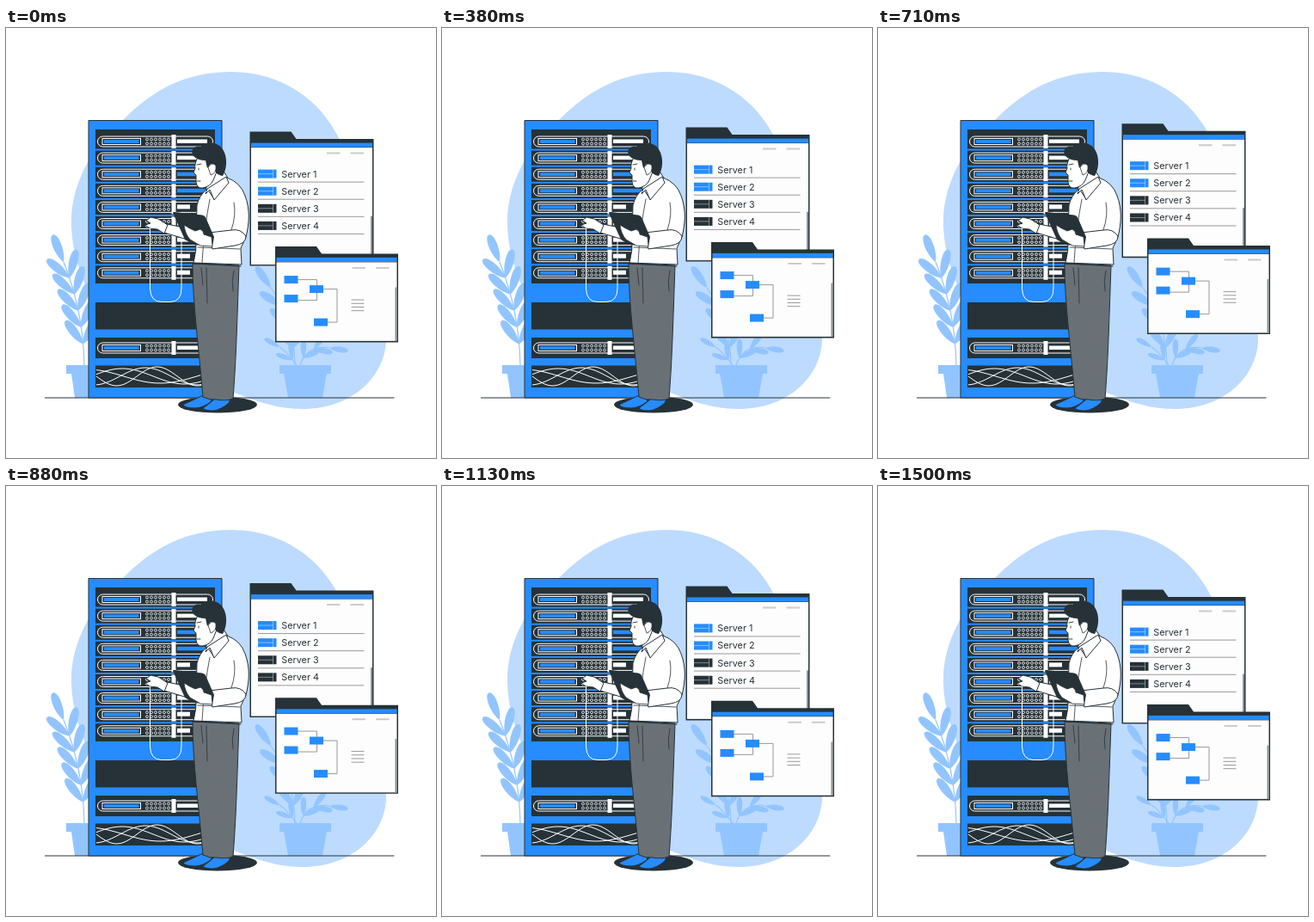
These frames come from a looping animation (500 px wide and 500 px high, 1540 ms). An HTML page:

```html
<!DOCTYPE html>
<html lang="en">
<head>
<meta charset="utf-8">
<title>Server room</title>
<style>
  html, body { margin: 0; width: 100%; height: 100%; overflow: hidden; background: #fff; }
  svg { display: block; width: 100%; height: 100%; }
  text { font: 10.8px Inter, "Open Sans", sans-serif; fill: #263238; }
  .blue { fill: #268cff; }
  .dark { fill: #263238; }
  .white { fill: #fff; }
  .paper { fill: #fdfdfd; }
  .shade { fill: #8c9194; }
  .plant { fill: #92c5ff; }
  .stem { fill: none; stroke: #92c5ff; stroke-width: 1.2; }
  .line { fill: none; stroke: #263238; stroke-linecap: round; stroke-linejoin: round; }
  .edge { stroke: #263238; stroke-linejoin: round; }
  .wire { fill: none; stroke: #fff; }
  .thin { fill: none; stroke: #999; }
  .dash { stroke: #ccc; stroke-width: 2; }
</style>
</head>
<body>
<svg viewBox="0 0 500 500">
  <path fill="#bddbff" d="M262 51C322 51 366 85 387 128C405 165 412 205 425 265C437 300 442 330 442 364C440 406 402 443 345 443C310 443 285 431 255 420C200 400 130 370 100 315C82 280 76 250 76 225C76 180 102 134 138 105C172 71 210 51 262 51Z"/>
  <g id="plants" class="plant">
    <path d="M70 392H126V402H120L116 430H80L76 402H70ZM318 392H378V402H373L368 430H328L323 402H318Z"/>
  </g>
  <path class="line" d="M45.500 430H451"/>
  <g id="rack"><path class="blue edge" d="M96 107.500H251V430H96Z"/></g>

  <ellipse class="dark" cx="246" cy="438" rx="46" ry="9.500"/>
  <g id="man">
    <path class="blue edge" d="M206 438Q217 433 227 428L240 429L238 435Q228 442 220 442Q208 442 206 438ZM229 442Q238 436 244 430L261 431L259 436Q250 444 241 445Q231 445 229 442Z"/>
    <path class="edge" fill="#697176" d="M217 274C217 320 224 370 229 429Q237 433 245 432Q256 434 264 431C268 380 269 330 271 276Z"/>
    <path class="line" d="M227 279L229 299M233 279L234 320M265 282Q262 295 264 306" stroke-width=".8"/>

    <path class="white edge" d="M187 228L222 235L221 249L184 238Z"/>
    <path class="white edge" d="M163 224L168 220L177 222L188 229L184 239L176 234L167 233L162 229L168 227Z"/>
    <path class="wire" d="M167.500 233V303Q168 318.500 181 318.500H191Q204 318 204 303V247"/>

    <path class="white edge" d="M235 169L254 168L260 178L242 200L232 193Z"/>
    <path class="white edge" d="M257 174Q273 180 278 195C284 211 283 227 279 243L273 256L274 275L218 273Q222 258 221 244L222 206Q225 194 234 187L242 199Z"/>
    <path class="white edge" d="M234 187L232 193L237 188L242 200L259 180L256 173Z"/>
    <path class="line" d="M237 199Q230 235 228 273M265 203Q268 217 262 235M223 255L272 257" stroke-width=".8"/>
    <path class="line" d="M218 274L273 277" stroke-width="1.200"/>

    <path class="white edge" d="M222 152Q219 160 220 163L218 168L221 171L221 179Q222 187 229 186Q238 184 241 177L247 162L239 147Z"/>
    <path class="dark" d="M218 149C213 142 220 136 226 138C232 131 247 132 252 141C258 150 257 164 252 172Q245 171 243 166Q243 158 238 158L234 163L232 154Q223 154 218 149Z"/>
    <path class="white edge" d="M235 162Q240 155 244 160Q245 169 238 171Z" stroke-width=".8"/>
    <path class="line" d="M222 159L227 158M224 163V165M222 178H226" stroke-width=".9"/>

    <path class="white edge" d="M236 238L262 235Q273 233 279 242Q279 251 266 253L240 257Z"/>
    <path class="dark" d="M194 215Q194 213.500 196 214L228 217.500Q231 218 232 220L242 243L240 254L218 252L208 246Z"/>
    <path class="white edge" d="M207 229Q213 233 220 236L226 234Q230 236 230 240L239 243L240 254L226 253L214 246Q208 239 207 229Z" stroke-width=".8"/>
  </g>
  <g id="panels"></g>
</svg>
<script>
  const $ = id => document.getElementById(id);
  const add = (id, markup) => $(id).insertAdjacentHTML('beforeend', markup);
  const repeat = (n, part) => Array.from({ length: n }, (_, i) => part(i)).join('');
  const path = (style, d) => `<path class="${style}" d="${d}"/>`;
  const box = (style, x, y, w, h, r = 0) =>
    `<rect class="${style}" x="${x}" y="${y}" width="${w}" height="${h}" rx="${r}"/>`;

  function leaf(x, y, angle, size) {
    const w = size * .2, m = -size * .6;
    return `<path transform="translate(${x} ${y}) rotate(${angle})" d="M0 0C${-w} ${m / 2} ${-w} ${-size} 0 ${-size}C${w} ${-size} ${w} ${m / 2} 0 0Z"/>`;
  }

  // A curved stem from a to c, bent towards b, with leaf pairs and a leaf at its tip.
  function branch(a, b, c, pairs, size) {
    return path('stem', `M${a}Q${b} ${c}`) + repeat(pairs + 1, i => {
      const s = .2 + .8 * i / pairs, r = 1 - s;
      const at = k => r * r * a[k] + 2 * r * s * b[k] + s * s * c[k];
      const slope = k => r * (b[k] - a[k]) + s * (c[k] - b[k]);
      const angle = Math.atan2(slope(0), -slope(1)) * 180 / Math.PI;
      const turns = i < pairs ? [-32, 32] : [0];
      return turns.map(turn => leaf(at(0), at(1), angle + turn, size)).join('');
    });
  }
  add('plants',
    branch([91, 392], [90, 330], [67, 272], 5, 34) +
    branch([336, 392], [335, 340], [308, 302], 3, 30) +
    branch([338, 392], [325, 375], [318, 371], 1, 20) +
    branch([342, 392], [350, 368], [376, 372], 2, 22));

  function server(y, bar) {
    return box('wire', 106.5, y - 6, 134, 12, 6) +
      box('wire', 112, y - 3.5, 44.5, 7) + box('blue', 114, y - 2, 40.5, 4) +
      repeat(12, k => `<circle class="wire" cx="${164 + k % 6 * 5}" cy="${y - 2.5 + (k > 5) * 5}" r="1.5" stroke-width=".8"/>`) +
      box('white', 192.5, y - 8, 5, 16) + bar;
  }

  function wave(k) {
    const y = x => 405 + (11 - k) * Math.sin((x - 105) / (15 + k * 4) + k * 1.7);
    return path('wire', 'M' + repeat(46, i => `${105 + i * 3} ${y(105 + i * 3)} `));
  }

  add('rack',
    box('dark', 104, 118, 139, 179) + box('dark', 104, 319, 139, 31.5) +
    box('dark', 104, 360, 139, 24) + box('dark', 104, 392.5, 139, 25.5) +
    repeat(9, i => {
      const y = 132 + i * 19.1;
      const bar = i > 3 ? box('white', 199, y - 3, 15, 5)
        : box(i > 1 ? 'blue' : 'white', 199, y - 2.5, 35, 4.5);
      return (i ? box('blue', 104, y - 10.5, 139, 2) : '') + server(y, bar);
    }) +
    server(372, box('white', 199, 369.5, 35, 4.5)) +
    repeat(4, wave));

  function folder(x, y, w, h, shadeTop) {
    const top = y + 18.5, bottom = y + h - 1.5, right = x + w - 2;
    return path('dark', `M${x} ${y}h48l6 8.500H${x + w}V${y + h}H${x}Z`) +
      box('blue', x + 1.5, y + 13, w - 3, 5) +
      box('paper', x + 1.5, top, w - 3, bottom - top) +
      box('shade', right - 1.5, shadeTop, 2, bottom - shadeTop) +
      path('dash', `M${x + 89.5} ${y + 25}h15.500m12 0h15.500`);
  }

  const listRow = i => {
    const y = 170 + i * 20.1;
    return box(i < 2 ? 'blue' : 'dark', 293, y - 5, 21.5, 10) +
      `<path class="wire" stroke-width=".7" opacity=".6" d="M293 ${y}h17.500m0 -5v10"/>
       <text x="320.300" y="${y + 4}">Server ${i + 1}</text>` +
      path('thin', `M293 ${y + 9.5}H416.500`);
  };
  const node = (x, y) => box('blue', x - 8, y - 4.5, 16, 9);

  add('panels',
    folder(283.5, 121, 144, 156, 219) + repeat(4, listRow) +
    folder(313, 254.3, 143, 111.5, 302) +
    path('thin', 'M339 293H361.500V317H339M369 304H385V342.500H373') +
    repeat(4, i => path('thin', `M401.500 ${316.5 + i * 4.2}h15`)) +
    node(331.5, 293) + node(361, 304) + node(331.5, 315) + node(366, 342.5));

  // The panels rise and sink by 10 units at constant speed, 24 poses per second.
  const LOOP = 1540, PERIOD = 1500, STEP = 1000 / 24, LEAD = 30;
  function draw(now) {
    const t = Math.floor((now % LOOP + 5) / STEP) * STEP;
    const phase = (t + LEAD) % PERIOD / PERIOD;
    const lift = 10 * (1 - Math.abs(2 * phase - 1));
    $('panels').setAttribute('transform', `translate(0 ${-lift})`);
    requestAnimationFrame(draw);
  }
  draw(performance.now());
</script>
</body>
</html>
```
